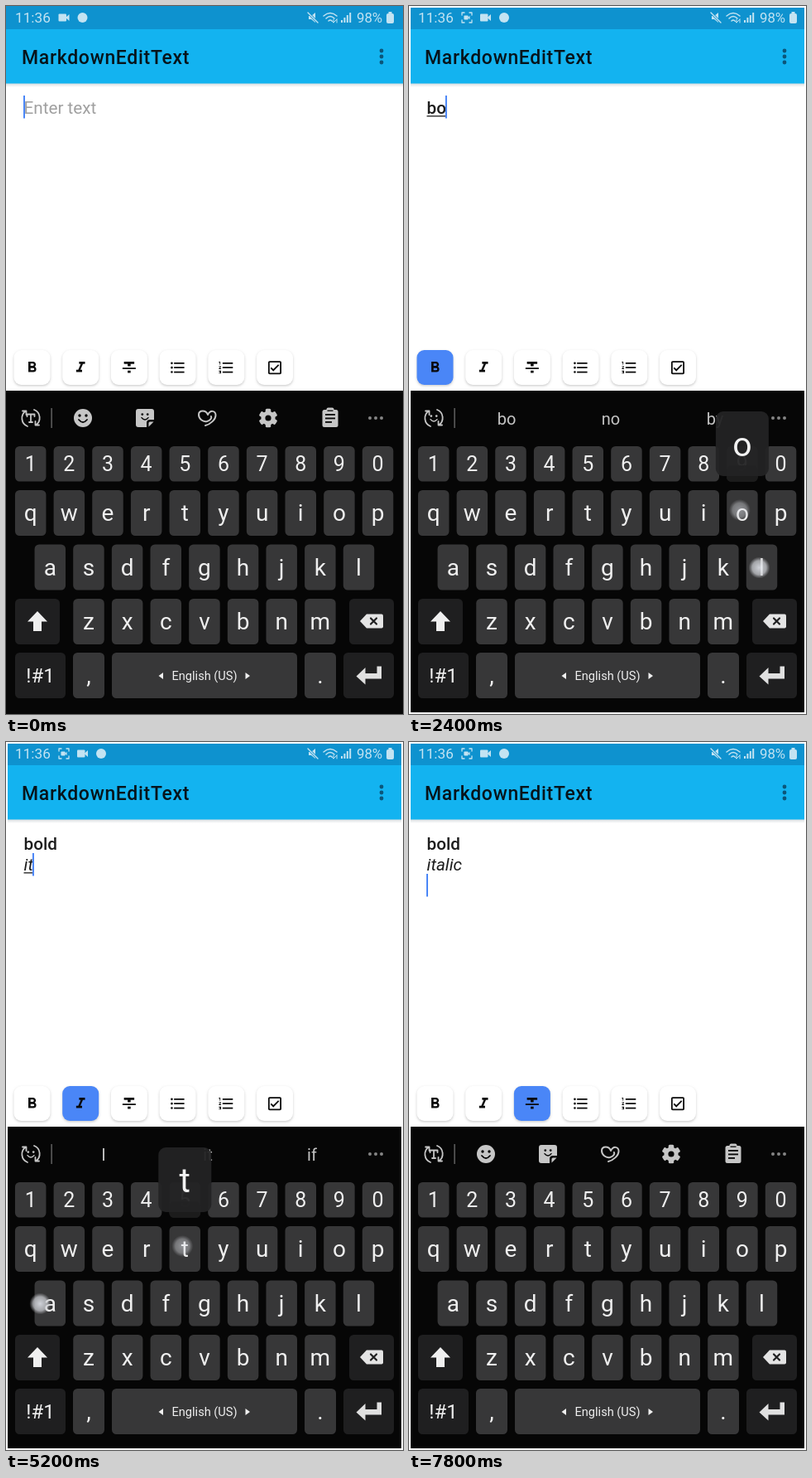
Animation, 480 px wide and 854 px high, one loop 8 s. Source, as an HTML page with a canvas:

```html
<!DOCTYPE html>
<html lang="en">
<head>
<meta charset="utf-8">
<title>Markdown editor</title>
<style>
html, body { margin: 0; width: 100%; height: 100%; overflow: hidden; background: #fff; }
canvas { display: block; width: 480px; height: 854px; }
</style>
</head>
<body>
<canvas id="stage"></canvas>
<script>
const W = 480, H = 854, LOOP = 8000, STEP = 200;
const cv = document.getElementById('stage');
const c = cv.getContext('2d');
const dpr = window.devicePixelRatio || 1;
cv.width = W * dpr;
cv.height = H * dpr;

const BLUE = '#4a86f7', PALE = '#7ba5fa', GREY = '#c6c6c6';
const KEY = '#373738', FN = '#1f1f20', KB = '#060606';

// Toolbar glyphs on a 24 unit grid
const BARS = 'M7 5h14v2H7zM7 11h14v2H7zM7 17h14v2H7z';
const GLYPHS = [
  'M15.6 10.79c.97-.67 1.65-1.77 1.65-2.79 0-2.26-1.75-4-4-4H7v14h7.04c2.09 0 3.71-1.7 3.71-3.79 0-1.52-.86-2.82-2.15-3.42zM10 6.5h3a1.5 1.5 0 0 1 0 3h-3zM13.5 15.5H10v-3h3.5a1.5 1.5 0 0 1 0 3z',
  'M10 4v3h2.21l-3.42 8H6v3h8v-3h-2.21l3.42-8H18V4z',
  'M10 19h4v-3h-4zM5 4v3h5v3h4V7h5V4zM3 14h18v-2H3z',
  BARS + [6, 12, 18].map(y => `M2.5 ${y}a1.5 1.5 0 0 1 3 0a1.5 1.5 0 0 1-3 0z`).join(''),
  BARS + 'M2 17h2v.5H3v1h1v.5H2v1h3v-4H2zM3 8h1V4H2v1h1zM2 11h1.8L2 13.1v.9h3v-1H3.2L5 10.9V10H2z',
  'M19 3H5a2 2 0 0 0-2 2v14a2 2 0 0 0 2 2h14a2 2 0 0 0 2-2V5a2 2 0 0 0-2-2zM19 19H5V5h14zM17.99 9l-1.41-1.42-6.59 6.59-2.58-2.57-1.42 1.41 4 3.99z'
].map(d => new Path2D(d));

// Keyboard layout: [label, centre x, top y, width, height, colour]
const keys = {};
function addKey(id, x, y, w, h, color) { keys[id] = { id, x, y, w, h, color }; }
function addRow(chars, x0, y, h) {
  [...chars].forEach((ch, i) => addKey(ch, x0 + 46.65 * i, y, 37.5, h, KEY));
}
addRow('1234567890', 29.7, 531, 42.5);
addRow('qwertyuiop', 29.7, 584, 55);
addRow('asdfghjkl', 53.3, 649.5, 55);
addRow('zxcvbnm', 100, 715, 55);
addKey('shift', 38, 715, 54, 55, FN);
addKey('back', 442, 715, 54, 55, FN);
addKey('!#1', 41.5, 780, 61, 55, FN);
addKey(',', 100, 780, 38, 55, KEY);
addKey('space', 240, 780, 224, 55, KEY);
addKey('.', 380, 780, 38, 55, KEY);
addKey('enter', 438.5, 780, 61, 55, FN);

const typed = [
  [2200, 'b', 'B|be|but'], [2400, 'o', 'bo|no|by'], [2600, 'l', 'Bol|bol|bowl'], [2800, 'd', 'Bolden|boldly|hold'],
  [5000, 'i', 'I|in|is'], [5200, 't', 'I|it|if'], [5400, 'a', 'Ita|its|Italy'], [5600, 'l', 'Ital|Italy|Italian'],
  [5800, 'i', 'Itali|Italian|Italia'], [6000, 'c', 'italics|italicized|italicize']
];
const breaks = [4000, 7000];
const toggles = [[0, 1400, 3400], [1, 4400, 6400], [2, 7400, LOOP]];
const resets = [-200, ...typed.map(e => e[0]), 3900, 6800].sort((a, b) => a - b);

function rr(x, y, w, h, r, color) {
  c.fillStyle = color;
  c.beginPath();
  c.roundRect(x, y, w, h, r);
  c.fill();
}
function rect(x, y, w, h, color) { c.fillStyle = color; c.fillRect(x, y, w, h); }
function dot(x, y, r, color) {
  c.fillStyle = color;
  c.beginPath();
  c.arc(x, y, r, 0, 7);
  c.fill();
}
function text(s, x, y, size, color, style = '', align = 'left', gap = 0) {
  c.font = `${style} ${size}px Roboto, sans-serif`;
  c.letterSpacing = gap + 'px';
  c.textAlign = align;
  c.fillStyle = color;
  c.fillText(s, x, y);
  c.letterSpacing = '0px';
}
function shape(d, color, x = 0, y = 0) {
  c.save();
  c.translate(x, y);
  c.fillStyle = color;
  c.fill(new Path2D(d), 'evenodd');
  c.restore();
}
function line(d, color, width, x = 0, y = 0) {
  c.save();
  c.translate(x, y);
  c.strokeStyle = color;
  c.lineWidth = width;
  c.lineCap = c.lineJoin = 'round';
  c.stroke(new Path2D(d));
  c.restore();
}

function camera(x, y, k, color) {
  rr(x - 6.5 * k, y - 4.5 * k, 9.5 * k, 9 * k, 1, color);
  shape(`M${2 * k} 0L${6.5 * k} ${-4 * k}V${4 * k}z`, color, x, y);
}

function statusBar(t) {
  const ink = '#c3e3f2';
  rect(0, 0, W, 28, '#0e92cf');
  text('11:36', 11, 20, 17.2, ink);
  const shift = t < STEP ? 0 : 22.5;
  if (shift) {
    line('M-6 -3V-6H-3M3 -6H6V-3M6 3V6H3M-3 6H-6V3', ink, 1.3, 70, 14);
    camera(70, 14, .55, ink);
  }
  camera(70 + shift, 14, 1, ink);
  dot(92.5 + shift, 14, 6, ink);
  // muted speaker
  shape('M-5 -2H-2L3 -6V6L-2 2H-5z', ink, 371, 14);
  line('M-6 -6L6 6', '#0e92cf', 3, 371, 14);
  line('M-6 -6L6 6', ink, 1.4, 371, 14);
  line('M-8 -2Q0 -9 8 -2M-5 1Q0 -4 5 1M-2 4Q0 2 2 4', ink, 1.5, 392, 14);
  line('M5 2V6M3 4L5 6L7 4M9 6V2M7 4L9 2', ink, 1, 391, 14);
  for (let i = 0; i < 4; i++) rect(405 + i * 3.4, 17 - i * 3, 2, 3 + i * 3, ink);
  text('98%', 424, 20, 16.8, ink);
  rr(460, 9, 9, 12, 2, ink);
  rect(462.5, 7, 4, 2.5, ink);
}

function appBar() {
  const g = c.createLinearGradient(0, 93, 0, 98);
  g.addColorStop(0, '#d4dadd');
  g.addColorStop(1, '#ffffff');
  rect(0, 93, W, 5, g);
  rect(0, 28, W, 65.5, '#13b3f0');
  text('MarkdownEditText', 19, 70, 23, '#07141b', '500', 'left', .68);
  for (let i = -1; i < 2; i++) dot(454, 61 + i * 7, 2.4, '#0b567a');
}

function content(t) {
  const lines = ['', '', ''];
  let row = 0, last = null;
  for (const [at, ch, tips] of typed) {
    if (at > t) break;
    row = at > breaks[0] ? 1 : 0;
    lines[row] += ch;
    last = tips;
  }
  const cur = breaks.filter(b => b <= t).length;
  const composing = lines[cur] !== '';
  const styles = ['500', 'italic', ''];
  if (!lines[0] && !cur) text('Enter text', 21.5, 130, 20.7, '#a0a0a0');
  let x = 22;
  lines.forEach((s, i) => {
    const y = 130 + i * 25;
    if (s) text(s, 21.5, y, 20.7, '#1c1c1c', styles[i]);
    if (i === cur && s) {
      const w = c.measureText(s).width;
      rect(21.5, y + 2.2, w, 1.3, '#1c1c1c');
      x = 21.5 + w;
    }
  });
  const base = resets.filter(r => r <= t).pop();
  if ((t - base) % 1000 < 500) rect(x - 1, (cur ? 109 : 108) + cur * 25, 2, 27.5, BLUE);
  return composing ? last.split('|') : null;
}

function formatBar(t) {
  GLYPHS.forEach((g, i) => {
    const x = 31.5 + 58.7 * i;
    let color = '#ffffff';
    for (const [id, on, off] of toggles)
      if (id === i && t >= on && t < off) color = t < on + STEP ? PALE : BLUE;
    c.save();
    c.shadowColor = 'rgba(0,0,0,.2)';
    c.shadowBlur = 3 * dpr;
    c.shadowOffsetY = 1.3 * dpr;
    rr(x - 22, 415, 44, 42, 9, color);
    c.restore();
    c.save();
    c.translate(x - 10.7, 425.5);
    c.scale(.89, .89);
    c.fillStyle = '#0a0a0a';
    c.fill(g, 'evenodd');
    c.restore();
  });
}

function face(x, y, k, color) {
  dot(x - 4 * k, y - 3 * k, 1.7 * k, color);
  dot(x + 4 * k, y - 3 * k, 1.7 * k, color);
  line(`M${-5 * k} ${2 * k}Q0 ${8 * k} ${5 * k} ${2 * k}`, color, 1.8 * k, x, y);
}

function gear(x, y) {
  c.save();
  c.translate(x, y);
  for (let i = 0; i < 6; i++) {
    rr(-3.2, -11.3, 6.4, 8, 1.5, GREY);
    c.rotate(Math.PI / 3);
  }
  c.restore();
  dot(x, y, 8.6, GREY);
  dot(x, y, 3.6, KB);
}

function suggestBar(tips) {
  line('M-4 10A10.5 10.5 0 0 1 -6 -8.5M4 -10A10.5 10.5 0 0 1 6 8.5M-10 -8.5H-5.5V-4M10 8.5H5.5V4', GREY, 1.8, 30, 497);
  rect(54.5, 485, 1.2, 24, '#777');
  for (let i = -1; i < 2; i++) dot(447 + i * 7, 497, 2, '#858585');
  if (tips) {
    face(30, 497, .8, GREY);
    tips.forEach((s, i) => text(s, 118 + 126 * i, 505, 20, '#c4c4c4', '', 'center'));
    return;
  }
  line('M-4.5 -2V-4.5H4.5V-2M0 -4.5V5M-2 5H2', GREY, 1.8, 30, 497);
  dot(93, 497, 11, GREY);
  face(93, 497, 1, KB);
  shape('M-8 -11H8Q11 -11 11 -8V2H6Q2 2 2 6V11H-8Q-11 11 -11 8V-8Q-11 -11 -8 -11zM4.5 10.5V6Q4.5 4.5 6 4.5H10.5z', GREY, 168, 497);
  face(168, 495, .8, KB);
  line('M-2 9C3 8 11 2 10.5 -4C10 -9 4 -10 1 -4C-1 -10 -10 -10 -10 -4C-10 1 -5 5 0 4C4 3 6 0 5 -2', GREY, 2, 243, 497);
  gear(317, 497);
  rr(382.5, 487, 19, 21, 2.5, GREY);
  rr(387.5, 484.5, 9, 6, 2, GREY);
  for (let i = 0; i < 3; i++) rect(386, 492 + i * 4.5, i === 2 ? 8 : 12, 1.8, KB);
  rect(388.5, 487.5, 7, 1.3, KB);
}

function drawKey(k, lit) {
  rr(k.x - k.w / 2, k.y, k.w, k.h, 5.5, lit ? '#666667' : k.color);
  const mid = k.y + k.h / 2, ink = '#efefef';
  if (k.id === 'shift') shape('M0 -12.5L12 0H5V11.5H-5V0H-12z', ink, k.x, mid);
  else if (k.id === 'back') {
    shape('M-14 0L-6 -8.5H12Q14 -8.5 14 -6.5V6.5Q14 8.5 12 8.5H-6z', '#e4e4e4', k.x, mid - .5);
    line('M-1 -3.5L6 3.5M6 -3.5L-1 3.5', FN, 2.2, k.x, mid - .5);
  } else if (k.id === 'enter') shape('M-15 2L-4 -8.5V-1.5H10V-10H15.5V5H-4V12z', '#e0e0e0', k.x, mid - 1);
  else if (k.id === 'space') {
    text('English (US)', k.x, 813, 14.6, ink, '', 'center');
    shape('M-3 0L2.5 -4V4z', ink, 187.5, 808);
    shape('M3 0L-2.5 -4V4z', ink, 292, 808);
  } else {
    const size = k.h < 50 ? 25 : k.id === '!#1' ? 24 : 28;
    text(k.id, k.x, mid + (size < 28 ? 8.7 : 9.7), size, ink, '', 'center');
  }
}

function popup(k) {
  const y = k.y - 95;
  c.save();
  c.globalAlpha = .95;
  rr(k.x - 19, k.y - 30, 38, 20, 6, '#1b1b1b');
  rr(k.x - 32, y, 64, 78, 9, '#232324');
  c.restore();
  text(k.id, k.x, y + 54, 41, '#f2f2f2', '', 'center');
}

function touch(x, y, alpha) {
  const g = c.createRadialGradient(x, y, 0, x, y, 13);
  g.addColorStop(0, `rgba(235,238,245,${alpha})`);
  g.addColorStop(.65, `rgba(205,207,212,${alpha * .85})`);
  g.addColorStop(1, 'rgba(180,180,185,0)');
  dot(x, y, 13, g);
}

function keyboard(t, tips) {
  rect(0, 464, W, H - 464, KB);
  suggestBar(tips);
  const entering = breaks.some(b => t >= b - STEP && t < b);
  for (const id in keys) drawKey(keys[id], id === 'enter' && entering);
  for (const [at, ch] of typed) {
    const k = keys[ch];
    const dx = ch === 'a' ? -12 : -3;
    if (t >= at - STEP && t < at) touch(k.x + dx, k.y + 28, .85);
    if (t >= at && t < at + STEP) {
      popup(k);
      touch(k.x + dx, k.y + 24, .5);
    }
  }
  breaks.forEach((b, i) => {
    if (t >= b - STEP && t < b) touch(426 + 15 * i, 820 - 7 * i, .85);
  });
}

function buttonTouches(t) {
  for (const [id, ...times] of toggles)
    for (const at of times) {
      if (at === LOOP || t < at - 2 * STEP || t >= at) continue;
      touch(34 + 58.7 * id, 441, t < at - STEP ? .45 : .85);
    }
}

function draw(t) {
  c.setTransform(dpr, 0, 0, dpr, 0, 0);
  rect(0, 0, W, H, '#ffffff');
  statusBar(t);
  appBar();
  const tips = content(t);
  formatBar(t);
  keyboard(t, tips);
  buttonTouches(t);
  if (t >= STEP) {
    c.strokeStyle = '#ffffff';
    c.lineWidth = 2;
    c.strokeRect(1, 1, W - 2, H - 2);
  }
}

const start = performance.now();
function tick(now) {
  const t = Math.max(0, now - start) % LOOP;
  draw(Math.floor(t / STEP) * STEP);
  requestAnimationFrame(tick);
}
draw(0);
requestAnimationFrame(tick);
</script>
</body>
</html>
```
